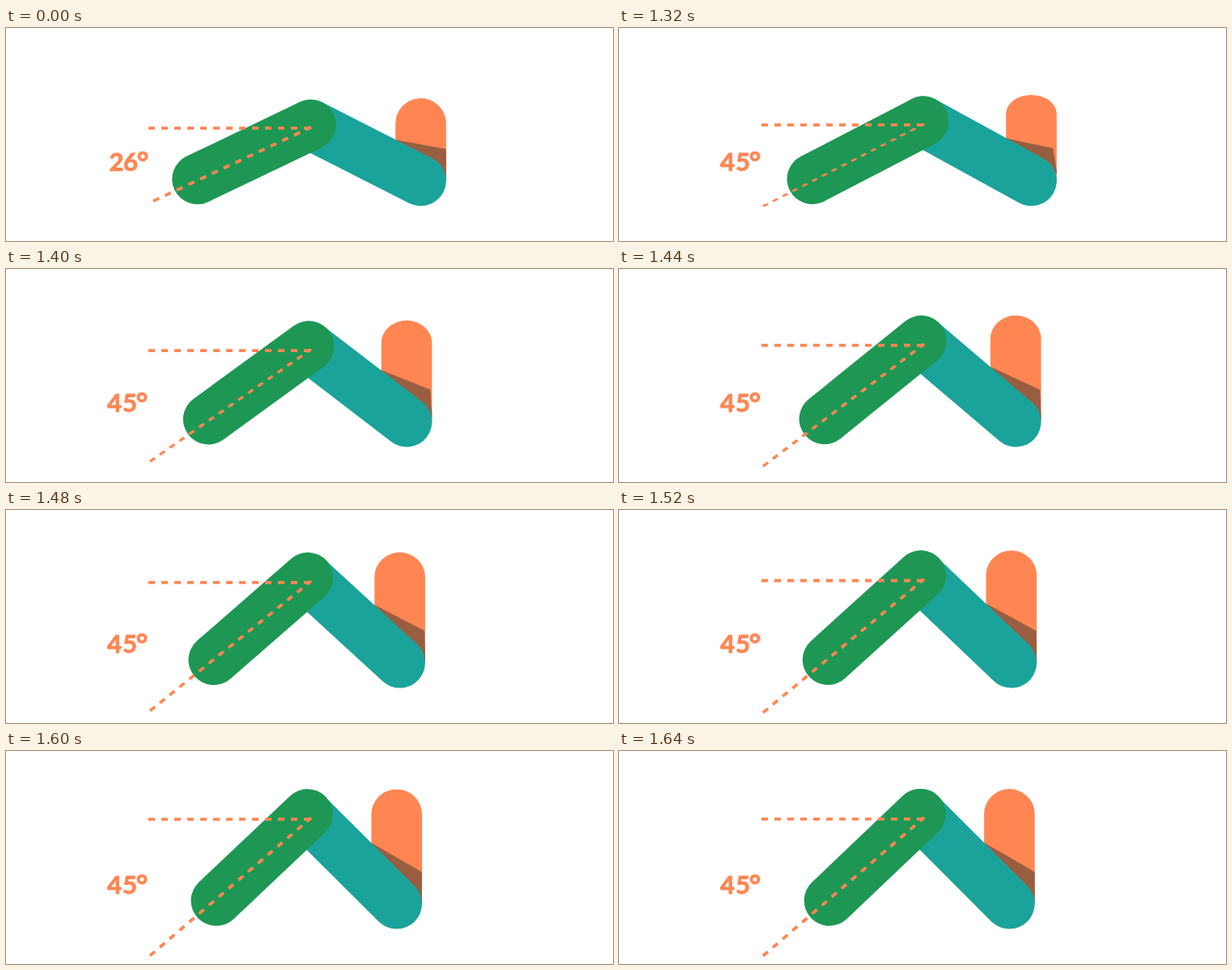
These frames come from a looping animation (750x264 px, 2680 ms). An HTML page:

```html
<!DOCTYPE html>
<html lang="en">
<head>
<meta charset="utf-8">
<title>Angle</title>
<style>
  html, body { margin: 0; width: 100%; height: 100%; overflow: hidden; background: #fff; }
  svg { display: block; }
  line { stroke-width: 62.6; stroke-linecap: round; }
  .dash { fill: none; stroke: #ff8653; stroke-width: 3.8; stroke-dasharray: 8 8; }
  text { font: 700 31px Lato, sans-serif; fill: #ff8653; stroke: #ff8653; stroke-width: .9; stroke-linejoin: round; }
  .deg { font-size: 35px; }
</style>
</head>
<body>
<svg width="750" height="264" viewBox="0 0 750 264">
  <path id="post" fill="#ff8653"/>
  <path id="shade" fill="#995e40"/>
  <line id="teal" stroke="#1aa39a"/>
  <line id="green" stroke="#1e9754"/>
  <path id="level" class="dash"/>
  <path id="slope" class="dash"/>
  <text id="low" x="127.5 145" y="176.5">26<tspan class="deg" x="161.8" y="178.5">°</tspan></text>
  <text id="high" x="125 144" y="176.5">45<tspan class="deg" x="160.8" y="178.5">°</tspan></text>
</svg>
<script>
const LOOP = 2680, START = 1320, STEP = 40, R = 31.3;
const EASE = [0, .1, .34, .58, .74, .86, .92, .965, .99, 1];
const $ = id => document.getElementById(id);
const mix = (a, b, p) => a + (b - a) * p;
const set = (id, attrs) => {
  for (const key in attrs) $(id).setAttribute(key, attrs[key]);
};

function draw(time) {
  const step = time < START ? 0 : Math.min(9, Math.floor((time - START) / STEP) + 1);
  const p = EASE[step], rest = step === 0;

  const apexX = mix(376.5, 372.5, p), apexY = mix(120, 78, p);
  const footX = mix(512.5, 482.4, p), footY = 189.3;
  set('green', { x1: mix(236.5, 260, p), y1: mix(187.3, 185.4, p), x2: apexX, y2: apexY });
  set('teal', { x1: apexX, y1: apexY + p, x2: footX, y2: footY });

  // While moving, the post is the raised one squeezed vertically.
  const left = footX - R, right = footX + R, top = mix(87, 47, p);
  const ry = rest ? R : R * (190 - top) / 143;
  set('post', { d: `M${left} 190V${top + ry}A${R} ${ry} 0 0 1 ${right} ${top + ry}V190Z` });

  const foldY = 138.5 - 20 * p - 5 * p * p;
  const cornerX = rest ? right : right - 5 * (1 - p);
  const cornerY = rest ? 150 : 149 + p;
  const tipY = rest ? 190 : 180 + 8 * p;
  set('shade', { d: `M${left} ${foldY}L${cornerX} ${cornerY}L${right + (rest ? 0 : .6 * (1 - p))} ${tipY}Z` });

  const levelY = mix(124.2, 84.3, p);
  set('level', { d: `M176 ${levelY}H376.5` });

  const endY = mix(123, 82.5, p), startY = mix(217.3, 254, p);
  const scale = rest ? 1 : (startY - endY) / 171.5;
  set('slope', {
    d: rest ? 'M182 214.5L377 123' : 'M178 254L377 82.5',
    transform: rest ? '' : `translate(0 ${endY - 82.5 * scale}) scale(1 ${scale})`
  });

  set('low', { visibility: rest ? 'visible' : 'hidden' });
  set('high', { visibility: rest ? 'hidden' : 'visible' });
}

const begin = performance.now();
function tick() {
  draw((performance.now() - begin) % LOOP);
  requestAnimationFrame(tick);
}
tick();
</script>
</body>
</html>
```
